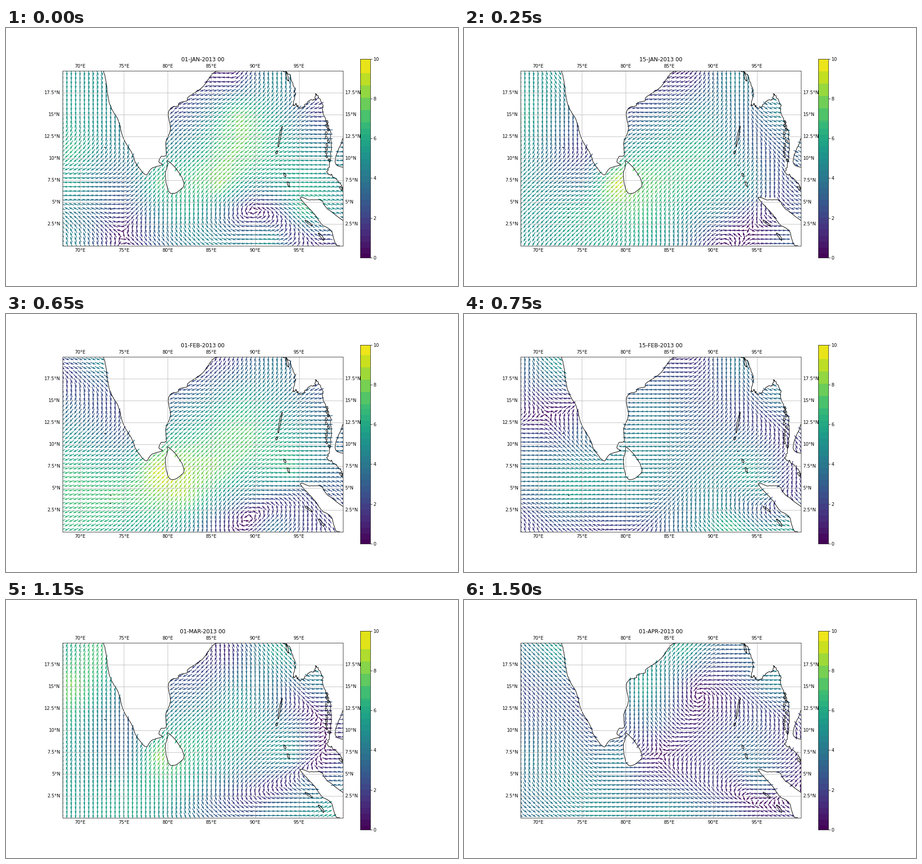
A matplotlib script that plays this animation: 990 by 566 pixels, repeating every 1750 ms.

```python
import numpy as np
import matplotlib.pyplot as plt
from matplotlib.animation import FuncAnimation
from matplotlib.path import Path

W, H, DPI = 990, 566, 72
plt.rcParams["font.family"] = "DejaVu Sans"
rng = np.random.default_rng(4)
fig = plt.figure(figsize=(W / DPI, H / DPI), dpi=DPI, facecolor="white")

LEFT, BASE, DEG = 123.75, 477.63, 613.8 / 32      # map corner and pixels per degree
ax = fig.add_axes([LEFT / W, 1 - BASE / H, 32 * DEG / W, 20 * DEG / H])
ax.set(xlim=(68, 100), ylim=(0, 20), xticks=[], yticks=[])


def geo(p):
    """Stage pixels to longitude and latitude."""
    p = np.asarray(p, float)
    return np.c_[68 + (p[:, 0] - LEFT) / DEG, (BASE - p[:, 1]) / DEG]


def curve(points, rough=0.3):
    """Catmull-Rom curve through stage points with a ragged edge."""
    p = np.array(points, float)
    p = np.vstack([2 * p[0] - p[1], p, 2 * p[-1] - p[-2]])
    t = np.linspace(0, 1, 8, endpoint=False)[:, None]
    parts = [b + t * (c - a) / 2 + t**2 * (2 * a - 5 * b + 4 * c - d) / 2
             + t**3 * (3 * b - a - 3 * c + d) / 2
             for a, b, c, d in zip(p, p[1:], p[2:], p[3:])]
    line = np.vstack(parts)
    line += rough * rng.normal(size=line.shape)
    return geo(np.vstack([p[1], line[1:], p[-2]]))


def island(x0, y0, x1, y1, width=2):
    """Ragged lens between two end points."""
    a, b = complex(x0, y0), complex(x1, y1)
    turn = np.linspace(0, 2 * np.pi, 15)
    r = rng.uniform(.7, 1.25, turn.size)
    r[-1] = r[0]
    axis = (b - a) / abs(b - a)
    z = (a + b) / 2 + axis * r * (abs(b - a) / 2 * np.cos(turn) + 1j * width * np.sin(turn))
    return geo(np.c_[z.real, z.imag])


# ---- coastlines, traced in stage pixels ----
india = curve([
    (213, 93), (218, 110), (222, 142), (229, 172), (246, 203), (257, 241), (276, 275),
    (286, 299), (306, 322), (319, 308), (342, 300), (335, 294), (340, 282), (351, 279),
    (350, 252), (360, 222), (355, 190), (362, 175), (376, 171), (380, 164), (396, 160),
    (400, 151), (430, 130), (445, 110), (457, 97), (478, 93)])
lanka = curve([
    (354, 291), (370, 305), (386, 330), (389, 348), (368, 363), (355, 356), (349, 322),
    (353, 304), (354, 291)])
burma = curve([
    (604, 93), (620, 104), (633, 140), (629, 168), (636, 166), (640, 173), (650, 174),
    (664, 160), (676, 156), (679, 145), (691, 163), (695, 188), (711, 232), (711, 285),
    (705, 318), (716, 325), (735, 346), (739, 355)], 0.9)
gulf = curve([(739, 306), (724, 300), (722, 284), (739, 240)])
sumatra = curve([
    (731, 478), (722, 474), (712, 445), (692, 431), (676, 409), (648, 378), (648, 371),
    (664, 377), (690, 378), (702, 395), (739, 423)])
shores = [india, lanka, burma, gulf, sumatra]
shores += [island(*ends) for ends in (
    (604, 217, 596, 259), (594, 269, 592, 276), (616, 337, 620, 347), (655, 422, 670, 433),
    (684, 449, 697, 466), (609, 319, 613, 326), (613, 96, 619, 118), (731, 348, 736, 356))]
for y in np.linspace(206, 290, 11):
    x = 704 + rng.uniform(-3, 4)
    shores.append(island(x - 1, y - 3, x + 1, y + 3))
for x, y in (216, 262), (229, 398), (228, 415), (599, 301):
    shores.append(island(x, y, x + 1, y, .5))
for shore in shores:
    ax.plot(*shore.T, color="black", lw=1.1, zorder=1.5)

# ---- graticule and labels ----


def label(text, xy, offset, ha, va, size=10):
    return ax.annotate(text, xy, offset, textcoords="offset points", ha=ha, va=va,
                       fontsize=size, annotation_clip=False)


GRID = dict(color="#b0b0b0", lw=0.8, zorder=2)
for lon in range(70, 100, 5):
    ax.axvline(lon, **GRID)
    label(f"{lon}°E", (lon, 20), (0, 5), "center", "bottom")
    label(f"{lon}°E", (lon, 0), (0, -5), "center", "top")
for lat in np.arange(2.5, 20, 2.5):
    ax.axhline(lat, **GRID)
    label(f"{lat:g}°N", (68, lat), (-5, 0), "right", "center")
    label(f"{lat:g}°N", (100, lat), (5, 0), "left", "center")
title = label("", (84, 20), (0, 21), "center", "baseline", 12)

# ---- sea points of the half-degree grid ----
lon, lat = (g.ravel() for g in np.meshgrid(np.arange(68, 100.1, .5), np.arange(.25, 20, .5)))
land = np.zeros(lon.size, bool)
for shape in (india, lanka, np.vstack([burma, gulf, [(101, 12), (101, 21)]]),
              np.vstack([sumatra, [(101, 3), (101, -1)]])):
    land |= Path(shape).contains_points(np.c_[lon, lat])
land &= ~((lon == 81) & (lat == 8.75))
sea = (lon + 1j * lat)[~land]

# ---- wind, interpolated from a few stations ----
STATIONS = {
    19: (68.5, 72.3, 87, 92.5),
    15: (69, 82, 88, 97),
    11: (69, 75, 83, 89, 95),
    7: (69, 75, 79, 86, 94),
    4: (74, 82, 90, 95.5),
    1: (69, 76, 85, 92, 98),
}
knots = np.array([x + 1j * y for y, row in STATIONS.items() for x in row])
n = len(knots)
system = np.ones((n + 1, n + 1))
system[:n, :n] = abs(knots[:, None] - knots)
system[n, n] = 0
reach = np.c_[abs(sea[:, None] - knots), np.ones(sea.size)]
scenes = []


def scene(date, top, *rows):
    """Rows hold heading (degrees from east) and speed for each station."""
    heading, speed = np.array(sum(rows, ()), float).reshape(-1, 2).T
    winds = speed * np.exp(1j * np.radians(heading))
    field = reach @ np.linalg.solve(system, np.append(winds, 0))
    upper = np.arange(top, 6.5, -.62)[::-1]
    edges = np.r_[0, np.arange(.2, upper[0] - .1, .3), upper, 10]
    scenes.append((date + "-2013 00", edges, field))


scene("01-JAN", 9.3,
      (268, 5.3, 288, 5, 170, 1.2, 265, 4.8),
      (268, 5.6, 195, 2.4, 217, 7.8, 188, 2),
      (230, 6.8, 258, 4.2, 222, 5, 215, 7.4, 195, 5),
      (182, 5.6, 195, 3, 235, 7, 225, 8.2, 187, 5.8),
      (172, 2.2, 272, 6, 60, .4, 146, 7),
      (110, 4.6, 305, 1.2, 325, 4.6, 10, 5, 172, 2.2))
scene("15-JAN", 9.4,
      (271, 5.2, 300, 5.2, 198, 1.2, 268, 4.8),
      (263, 5.8, 185, 2.8, 222, 4.8, 345, 4.5),
      (250, 5, 265, 1.6, 215, 5.6, 223, 6.2, 265, 2.8),
      (220, 5, 192, 3.6, 222, 9.4, 235, 6.8, 236, 5.2),
      (212, 6, 258, 6.8, 205, 4.4, 270, 1.4),
      (240, 5, 230, 5.8, 262, 5, 130, .8, 2, 2.6))
scene("01-FEB", 9.5,
      (335, 2, 335, 4.6, 240, 2, 260, 4),
      (245, 3, 192, 3.6, 223, 6, 194, 3),
      (220, 5, 238, 2.6, 220, 6.2, 224, 7.4, 198, 5),
      (198, 6.8, 205, 5.8, 222, 9.5, 236, 7.6, 182, 6.8),
      (198, 7.2, 246, 8.4, 190, 3.6, 130, 2),
      (207, 6.6, 220, 5.8, 265, 2.6, 42, 3.8, 125, 1.8))
scene("15-FEB", 9.3,
      (272, 3.2, 325, 5.4, 186, 1.8, 278, 4.2),
      (300, 1.6, 181, 4, 215, 2.6, 348, 4),
      (180, 2.4, 100, 3.4, 182, 4.6, 222, 2.8, 235, 2.6),
      (185, 4.2, 165, 5.2, 180, 5, 215, 4, 203, 5.8),
      (172, 5.6, 186, 4.4, 258, 4.8, 205, 4.5),
      (110, 2, 150, 2, 262, 3.2, 322, 6.6, 338, 5))
scene("01-MAR", 9.1,
      (252, 5.8, 250, 7.2, 285, 1.2, 304, 5.8),
      (256, 8, 198, 2.6, 255, 4.6, 352, 4),
      (258, 6, 275, 2.6, 226, 5.4, 240, 5.6, 200, 2.8),
      (252, 5.2, 267, 3, 240, 8.2, 245, 5.8, 190, 5.4),
      (266, 5.4, 266, 5.8, 225, 2.4, 320, 3.4),
      (264, 5.6, 273, 6, 318, 2.8, 0, 3.8, 25, 5.2))
scene("15-MAR", 8.87,
      (285, 4.2, 306, 7, 48, 2.4, 314, 2.8),
      (266, 5.4, 135, 2.8, 290, .8, 357, 4),
      (256, 5.6, 265, 2, 184, 4.4, 200, 3.8, 192, 2.4),
      (234, 4.6, 205, 2, 180, 3.4, 196, 4.4, 210, 5.4),
      (222, 2.8, 184, 4.3, 192, 3.6, 205, 4.5),
      (216, 2.8, 188, 2.4, 181, 2.4, 181, 1.6, 30, 4))
scene("01-APR", 9.5,
      (312, 3.6, 318, 5.6, 50, 5.6, 355, 2.8),
      (308, 2.2, 92, 6, 40, .5, 352, 4.6),
      (292, 2.6, 315, 2.6, 118, 3.4, 228, 1.2, 250, 2.6),
      (275, 4.2, 315, 3.6, 15, 4.6, 235, 1.2, 202, 3.8),
      (302, 4.8, 335, 2.2, 275, 1.8, 182, 3.6),
      (325, 3.6, 352, 5, 352, 5, 357, 3, 330, 1.2))

# ---- arrows and colour bar ----
ones = np.ones(sea.size)
arrows = ax.quiver(sea.real, sea.imag, ones, ones, ones, pivot="mid", scale=46,
                   cmap="viridis", clim=(0, 10), zorder=1)

cax = fig.add_axes([.125 + .85 * .775, .11, .77 * H / 20 / W, .77])
levels = np.linspace(0, 10, 437)[:, None]
bar = cax.imshow(levels, cmap="viridis", vmin=0, vmax=10, extent=(0, 1, 0, 10),
                 origin="lower", aspect="auto", interpolation="nearest")
cax.set(xticks=[], yticks=range(0, 11, 2))
cax.yaxis.tick_right()


def banded(values, edges):
    mids = (edges[1:] + edges[:-1]) / 2
    return mids[np.clip(np.searchsorted(edges, values, "right") - 1, 0, len(mids) - 1)]


def update(i):
    date, edges, wind = scenes[i]
    speed = abs(wind)
    unit = wind / np.maximum(speed, 1e-9)
    arrows.set_UVC(unit.real, unit.imag, banded(speed, edges))
    bar.set_data(banded(levels, edges))
    title.set_text(date)
    return arrows, bar, title


anim = FuncAnimation(fig, update, frames=len(scenes), interval=250, repeat=True,
                     repeat_delay=0, blit=False)
plt.show()
```
